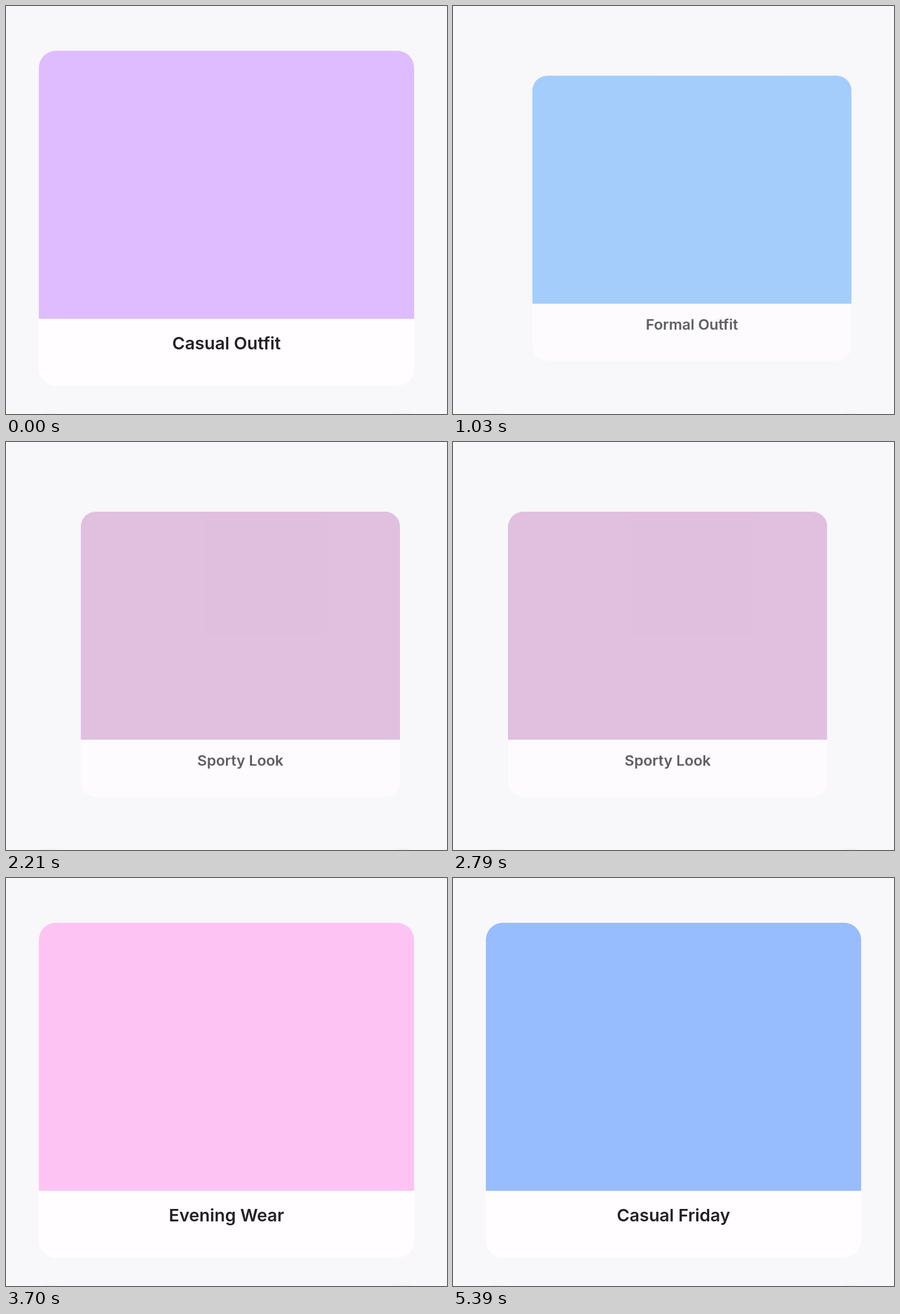
An HTML page that plays this animation: 778x720 px, repeating every 5480 ms.

```html
<!DOCTYPE html>
<html lang="en">
<head>
<meta charset="utf-8">
<title>Outfit carousel</title>
<style>
  html, body { margin: 0; width: 100%; height: 100%; overflow: hidden; background: #f8f7fa; }
  #stage { position: relative; width: 778px; height: 720px; overflow: hidden; background: #f8f7fa; }
  .card {
    position: absolute; left: 58px; top: 79px; width: 662px; height: 591px;
    border-radius: 30px; overflow: hidden; background: #fffdff;
    will-change: transform, opacity;
  }
  .swatch { height: 473px; }
  .label {
    position: absolute; left: 0; right: 0; top: 496px; line-height: 40px;
    text-align: center; color: #232126;
    font: 600 30.5px/40px Inter, "Liberation Sans", sans-serif;
  }
  .shade {
    position: absolute; top: 714px; width: 44px; height: 16px;
    background: radial-gradient(closest-side, #eeedf0, #f8f7fa);
  }
</style>
</head>
<body>
<div id="stage">
  <div class="shade" style="left:55px"></div>
  <div class="shade" style="left:679px"></div>
</div>
<script>
const LOOP = 5480, PAGE = 778, SETTLE = 75;
const looks = [
  ["Casual Outfit", "#debcff"],
  ["Formal Outfit", "#85bdfd"],
  ["Sporty Look", "#d8aad5"],
  ["Evening Wear", "#fdc4f3"],
  ["Casual Friday", "#97bdff"],
];
// Each swipe: first touch, moment of release, build-up time constant (ms)
const swipes = [
  [580, 796, 50],
  [1700, 1954, 58],
  [2790, 3007, 50],
  [3850, 3945, 22],
];

const stage = document.getElementById("stage");
const cards = looks.map(([name, color]) => {
  const card = document.createElement("div");
  card.className = "card";
  card.innerHTML = `<div class="swatch" style="background:${color}"></div><div class="label">${name}</div>`;
  return stage.appendChild(card);
});

// Finger drag speeds up until release, then the page glides to rest
function travel(t, [start, release, build]) {
  if (t < start) return 0;
  const x = (t - release) / (t < release ? build : SETTLE);
  const p = 1 / (1 + Math.exp(-x));
  return PAGE * (1 - p) < 0.3 ? 1 : p;
}

function draw(t) {
  const scroll = PAGE * swipes.reduce((sum, s) => sum + travel(t, s), 0);
  cards.forEach((card, i) => {
    const dx = i * PAGE - scroll;
    const away = Math.min(1, Math.abs(dx) / 7);
    card.style.visibility = Math.abs(dx) < PAGE ? "visible" : "hidden";
    card.style.transform = `translateX(${dx}px) scale(${1 - 0.15 * away})`;
    card.style.opacity = 1 - 0.27 * away;
  });
}

const t0 = performance.now();
function tick() {
  draw((performance.now() - t0) % LOOP);
  requestAnimationFrame(tick);
}
tick();
</script>
</body>
</html>
```
